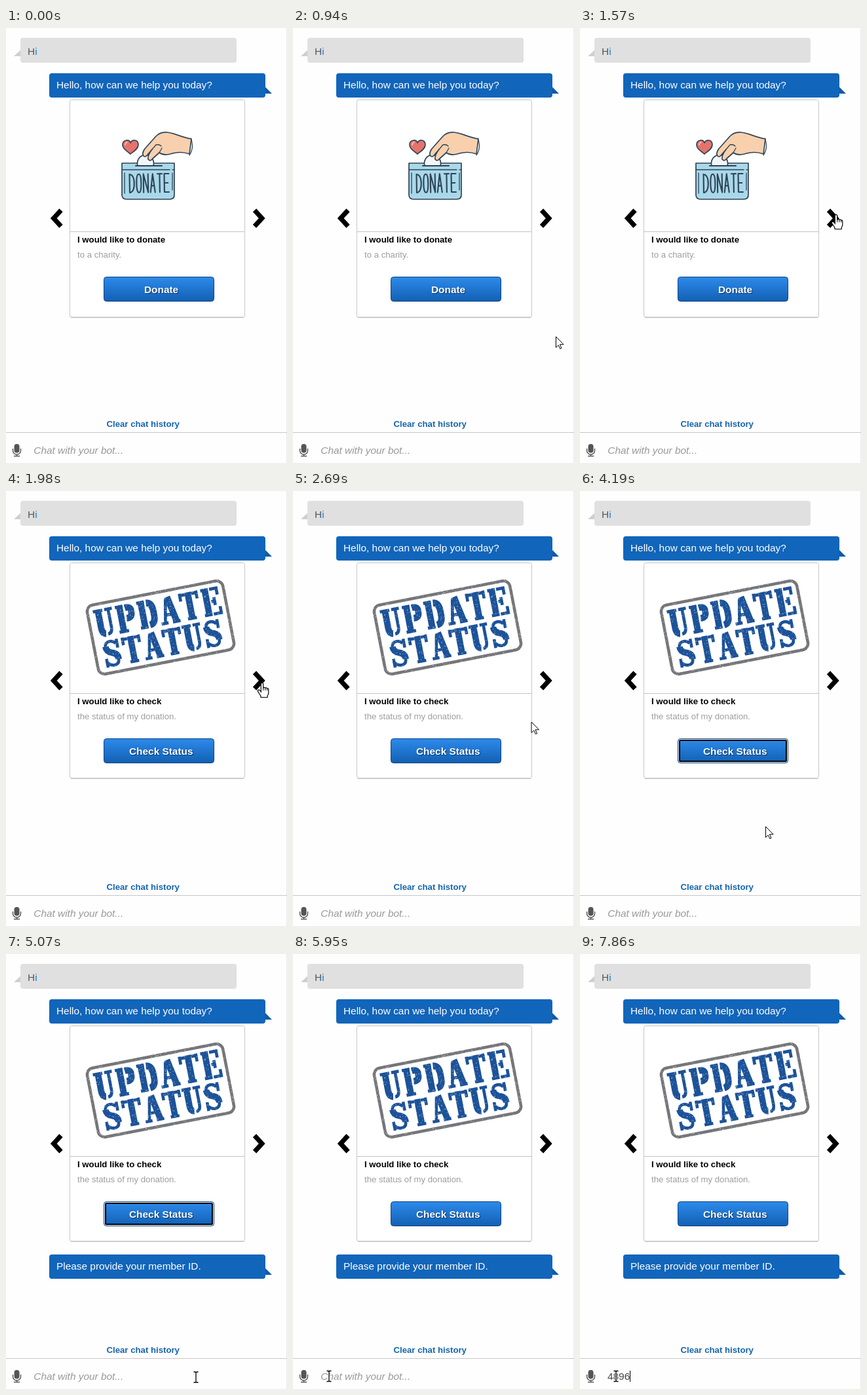
Write an HTML page that moves like this. It is 429 px wide and 663 px high and loops after 8 s.

```html
<!DOCTYPE html>
<html lang="en">
<head>
<meta charset="utf-8">
<title>Donation chat bot</title>
<style>
html, body { margin: 0; width: 100%; height: 100%; overflow: hidden; background: #fefefe; }
svg { display: block; }
text { font-family: "Liberation Sans", Arial, sans-serif; font-size: 15.4px; white-space: pre; }
.small { font-size: 13.2px; }
.bold { font-weight: bold; }
.label { fill: #fff; font-weight: bold; text-shadow: 1px 1px 1px #0a3566; }
.line { fill: none; stroke: #2f4457; stroke-width: 1.7; stroke-linecap: round; stroke-linejoin: round; }
</style>
</head>
<body>
<svg id="stage" width="429" height="663" viewBox="0 0 429 663"></svg>
<script>
const LOOP = 8000;
const SWAP = 1780, PRESS = 3850, REPLY = 4330, FOCUS = 5420;
const typed = [[6940, "4"], [7270, "48"], [7400, "489"], [7860, "4896"]];

// time, x, y of the pointer's hot spot
const track = [
  [660, 406, 588], [900, 401, 470], [1130, 389, 340], [1290, 381, 264],
  [1430, 391, 284], [1640, 391, 284], [1980, 391, 292], [2260, 392, 310],
  [2540, 397, 331], [2820, 330, 372], [3110, 267, 398], [3850, 267, 398],
  [4190, 283, 511], [4470, 290, 645], [5070, 290, 645], [5280, 170, 654],
  [5490, 48, 648], [5690, 55, 643.5]
];

const path = (d, attrs = "") => `<path d="${d}" ${attrs}/>`;
const text = (x, y, str, attrs) => `<text x="${x}" y="${y}" ${attrs}>${str}</text>`;
const group = (attrs, body) => `<g ${attrs}>${body}</g>`;
const rect = (x, y, w, h, r, attrs) =>
  `<rect x="${x}" y="${y}" width="${w}" height="${h}" rx="${r}" ${attrs}/>`;

const gradient = (id, top, bottom) =>
  `<linearGradient id="${id}" x1="0" y1="0" x2="0" y2="1">
    <stop stop-color="${top}"/><stop offset="1" stop-color="${bottom}"/></linearGradient>`;

const bubble = (y, str) =>
  path(`M395 ${y + 20}l11 11h-11z`, 'fill="#125ba8"') +
  rect(66, y, 330, 37, 4, 'fill="#1165ba"') +
  text(77, y + 23, str, 'fill="#fff"');

function chevrons(y) {
  const d = `M84 ${y - 12.3}L72.7 ${y}L84 ${y + 12.3}`;
  const style = 'fill="none" stroke="#000" stroke-width="7.2"';
  return path(d, style) + group('transform="translate(463.5 0) scale(-1 1)"', path(d, style));
}

function donateArt() {
  const letters = [
    "M0 0V28Q7 27 7 14Q7 1 0 0", "M3.5 0Q7 0 7 14T3.5 28Q0 28 0 14T3.5 0",
    "M0 28V0L7 28V0", "M0 28L3.5 0L7 28M1.2 18H5.8", "M0 0H7M3.5 0V28", "M7 0H0V28H7M0 14H5.5"
  ];
  const word = letters.map((d, i) =>
    path(d, `transform="translate(${i * 10.6} 0)" class="line" style="stroke-width:2.1"`)).join("");
  return path("M190 192C184 187 178 184 178 178C178 170 188 169 190 175C193 169 202 170 202 178C202 184 195 188 190 192Z",
      'class="line" style="fill:#e5736c"') +
    path("M182 178q0-3 3-4", 'class="line" style="stroke:#f8c5bf"') +
    path("M177 206H257V254Q257 261 250 261H184Q177 261 177 254Z", 'class="line" style="fill:#a9d8e9"') +
    path("M177 216H250M254 216h3M181 221v31M254 221v26", 'class="line" style="stroke-width:1.3"') +
    path("M201 210a12.5 13 0 1 1 24 0z", 'class="line" style="fill:#f3f6f7"') +
    path("M198 210H238", 'class="line" style="stroke-width:2.2"') +
    path("M283 169C269 167 257 160 246 159Q235 158 228 166L212 184Q207 191 210 195Q213 198 217 192L223 185Q216 194 217 200Q220 204 224 199L234 190Q241 195 251 192Q266 187 280 192Z",
      'class="line" style="fill:#f9d0ad"') +
    path("M223 185l6-7q5-1 8 2M234 190l4-7M282 168q6 13-2 26", 'class="line" style="stroke-width:1.3"') +
    group('transform="translate(188.5 223) rotate(-1)"', word);
}

// Slab stencil letters on a 30 x 42 cell: heavy strokes, then fine ones
const slab = {
  U: ["M8 2V28Q8 37 14 38", "M0 2H15M18 2H30M24 2V29Q24 39 17 39"],
  P: ["M8 0V42M16 5Q26 4 25 13Q25 22 16 21", "M1 2H13M1 40H16"],
  D: ["M8 0V42M16 4Q26 5 25 21Q26 37 16 38", "M1 2H13M1 40H13"],
  A: ["M16 1L24 40", "M13 4L6 40M10 28H17M0 40H11M18 40H30"],
  T: ["M15 0V42", "M0 3H10M20 3H30M2 0V12M28 0V12M8 40H22"],
  E: ["M8 0V42", "M1 2H13M15 2H26V12M15 21H20M20 15V27M1 40H13M15 40H27V30"],
  S: ["M6 9Q6 17 14 20Q24 23 23 32", "M6 10Q6 2 14 2Q20 2 23 7M25 0V14M23 31Q23 40 15 40Q9 40 5 35M4 28V42"]
};

function stampWord(word, x, y, pitch, sx, sy) {
  return [...word].map((c, i) =>
    group(`transform="translate(${x + i * pitch} ${y}) scale(${sx} ${sy})" fill="none" stroke="#1c5299"`,
      path(slab[c][0], 'stroke-width="10"') + path(slab[c][1], 'stroke-width="4.8"'))).join("");
}

function stampArt() {
  let seed = 11, dust = "";
  const rnd = () => (seed = seed * 16807 % 2147483647) / 2147483647;
  for (let i = 0; i < 1100; i++) {
    dust += `M${(rnd() * 220 - 110).toFixed(1)} ${(rnd() * 114 - 57).toFixed(1)}h${(0.4 + rnd()).toFixed(1)}`;
  }
  return group('transform="translate(236 208) rotate(-11)"',
    rect(-105.5, -53.5, 211, 107, 10, 'fill="none" stroke="#74767a" stroke-width="4.6"') +
    stampWord("UPDATE", -97, -45, 33.2, 0.98, 1.01) +
    stampWord("STATUS", -94, 4, 31.3, 0.96, 0.97) +
    path(dust, 'stroke="#fff" stroke-width="0.9" opacity="0.7"'));
}

function button(y, x, str, id) {
  return group(`id="${id}"`,
    rect(149.5, y + 0.5, 168, 37, 4, 'class="face" fill="url(#normal)" stroke="#0e4480"') +
    group('class="ring" visibility="hidden" fill="none"',
      rect(150.5, y + 1.5, 166, 35, 3, 'stroke="#fff"') +
      rect(152, y + 3, 163, 32, 2, 'stroke="#000" stroke-width="2"')) +
    text(x, y + 25, str, 'class="label"'));
}

function card(id, dy, bottom, art, title, sub, label, labelX) {
  return group(`id="${id}"`,
    rect(97.5, 109.5, 267, bottom - 109, 3, 'fill="#fff" stroke="#c8c8c8"') +
    path(`M99 ${bottom + 0.5}H363`, 'stroke="#b4b4b4"') + art +
    path(`M98 ${310.5 - dy}H364`, 'stroke="#c4c4c4"') +
    text(109, 327 - dy, title, 'class="small bold"') +
    text(109, 350 - dy, sub, 'class="small" fill="#9b9f9f"') +
    button(379 - dy, labelX, label, id + "Button") +
    chevrons(290 - dy / 2));
}

const mic =
  rect(12.5, 634, 8, 13.5, 4, 'fill="#555"') +
  path("M10.5 641v3a6 6 0 0 0 12 0v-3M16.5 650v3M12 652.5h9", 'fill="none" stroke="#555" stroke-width="1.4"');

const pointers =
  group('id="arrow"', path("M.5 .5V17L4.3 13.4L6.9 19L9 18L6.5 12.3H12Z",
    'fill="#fff" stroke="#000" stroke-linejoin="round"')) +
  group('id="hand"',
    path("M-1.7 1.5Q0-.8 1.7 1.5V8Q3.3 6.7 4.8 8.2Q6.5 7.2 7.7 9Q9.6 8.4 9.8 10.6V16Q9.7 18 8.2 20V22.5H-2V20.5L-6.5 13.6Q-7 11-5 11Q-3.3 11.5-1.7 14Z",
      'fill="#fff" stroke="#000" stroke-width="1.2"') +
    path("M1.8 8v4M4.8 8.4v3.6M7.7 9.2v3", 'stroke="#000"')) +
  group('id="beam"', ["#fff", "#000"].map((c, i) =>
    path("M-3.5-8H-1L0-7L1-8H3.5M0-7V7M-3.5 8H-1L0 7L1 8H3.5",
      `fill="none" stroke="${c}" stroke-width="${i ? 1.3 : 2.8}"`)).join(""));

const $ = id => document.getElementById(id);

$("stage").innerHTML =
  `<defs>${gradient("normal", "#2d8aea", "#1260b4")}${gradient("hover", "#1465bb", "#0d4884")}</defs>` +
  path("M428.5 0V663", 'stroke="#ececec"') +
  path("M12 43L23 33V43Z", 'fill="#cfcfcf"') +
  rect(22, 15, 330, 38, 4, 'fill="#e0e0e0"') +
  text(33, 41, 'H<tspan fill="#0f7be0">i</tspan>', 'fill="#4f5a66"') +
  bubble(69, "Hello, how can we help you today?") +
  card("donate", 0, 440.5, donateArt(), "I would like to donate", "to a charity.", "Donate", 211) +
  card("status", 2, 437.5, stampArt(), "I would like to check", "the status of my donation.", "Check Status", 188) +
  group('id="reply"', bubble(458, "Please provide your member ID.")) +
  text(153.5, 608, "Clear chat history", 'class="small bold" fill="#1765ad"') +
  path("M0 616.5H429", 'stroke="#c8c8c8"') + mic +
  text(42.3, 649, "Chat with your bot...", 'id="hint" fill="#999" font-style="italic"') +
  text(42, 649, "", 'id="entry" fill="#444"') +
  path("M42.5 635V652", 'id="caret" stroke="#000"') +
  group('id="pointer"', pointers);

const show = (el, on) => el.setAttribute("visibility", on ? "inherit" : "hidden");

// Pointer moves in ticks of about 70 ms
function pointerAt(t) {
  const i = track.findIndex(k => k[0] > t);
  if (i < 0) return track[track.length - 1].slice(1);
  const [t0, x0, y0] = track[i - 1], [t1, x1, y1] = track[i];
  const n = Math.max(1, Math.round((t1 - t0) / 70));
  const p = Math.floor((t - t0) / (t1 - t0) * n + 0.01) / n;
  return [x0 + (x1 - x0) * p, y0 + (y1 - y0) * p];
}

function render(t) {
  const moved = t >= track[0][0];
  const [x, y] = moved ? pointerAt(t) : [0, 0];
  const overButton = x > 149 && x < 318 && y > 377 && y < 416;
  const overArrow = x > 376 && x < 397 && y > 274 && y < 306;
  const kind = y > 617 ? "beam" : overButton || overArrow ? "hand" : "arrow";

  show($("pointer"), moved);
  $("pointer").setAttribute("transform", `translate(${x} ${y})`);
  for (const id of ["arrow", "hand", "beam"]) show($(id), id === kind && moved);

  show($("donate"), t < SWAP);
  show($("status"), t >= SWAP);
  show($("reply"), t >= REPLY);
  $("statusButton").querySelector(".face").setAttribute("fill", `url(#${overButton ? "hover" : "normal"})`);
  show($("statusButton").querySelector(".ring"), t >= PRESS && t < FOCUS);

  const entry = typed.reduce((s, [at, str]) => t >= at ? str : s, "");
  $("entry").textContent = entry;
  show($("hint"), !entry);
  show($("caret"), t >= FOCUS && (entry || Math.floor((t - FOCUS) / 530) % 2 === 0));
  $("caret").setAttribute("transform", `translate(${Math.round(entry.length * 8.56)} 0)`);
}

const start = performance.now();
function frame() {
  render((performance.now() - start) % LOOP);
  requestAnimationFrame(frame);
}
frame();
</script>
</body>
</html>
```
